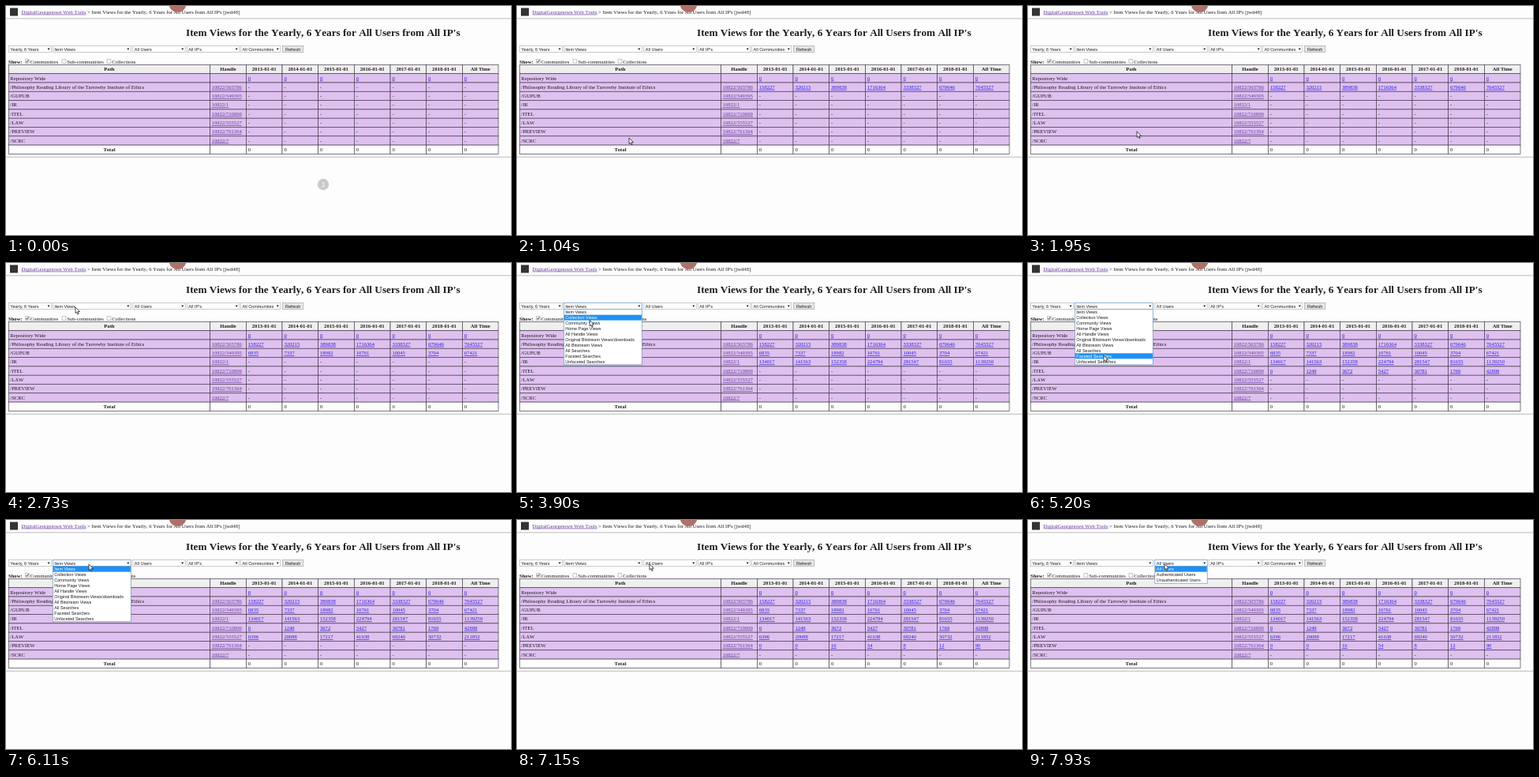
Write an HTML page that moves like this. It is 640x290 px and loops after 8 s.

```html
<!DOCTYPE html>
<html lang="en">
<head>
<meta charset="utf-8">
<title>Item Views</title>
<style>
html, body { margin: 0; width: 100%; height: 100%; overflow: hidden; background: #fdfdfd; }
svg { display: block; width: 640px; height: 290px; }
text { font: 6.62px "Liberation Serif", "Times New Roman", serif; font-kerning: none; white-space: pre; fill: #1c1c1c; }
.b { font-weight: bold; }
.h1 { font-size: 13.23px; font-weight: bold; }
.s { font: 5.51px "Liberation Sans", Arial, sans-serif; }
.m { text-anchor: middle; }
.link { fill: #2a1cd8; text-decoration: underline; }
.seen { fill: #66399a; text-decoration: underline; }
.white { fill: #fff; }
</style>
</head>
<body>
<svg id="stage" viewBox="0 0 640 290"></svg>
<script>
const stage = document.getElementById('stage');
const LOOP = 8000, STEP = 130, ROW = 11.3, TOP = 74.4, ITEM = 6.95, LIST = 58.7;
const cols = [3.3, 258.6, 304.4, 350, 395.6, 441.4, 487, 532.6, 578.4, 624];
const heads = ['Path', 'Handle', ...[2013, 2014, 2015, 2016, 2017, 2018].map(y => y + '-01-01'), 'All Time'];

// path | handle | counts | time the counts arrive
const rows = [
  'Philosophy Reading Library of the Tarrowby Institute of Ethics|503786|158227 320215 389838 1716364 3338327 679646 7045527|780',
  'GUPUB|549395|6835 7337 18982 10761 10045 3704 67421|2080',
  'IR|1|134017 141563 152358 224794 281547 81655 1139250|3380',
  'ITEL|710899|0 1249 3672 5427 30781 1769 42898|4550',
  'LAW|555527|6396 20088 17217 41638 69240 50732 211852|5720',
  'PREVIEW|761364|0 0 16 54 8 12 90|6890',
  'SCRC|7||Infinity'
].map(r => r.split('|'));

const selects = [
  [3.3, 54.3, 'Yearly, 6 Years'], [59.3, 99, 'Item Views'], [160.8, 66.4, 'All Users'],
  [229.3, 66.4, "All IP's"], [297.5, 50.3, 'All Communities']
];
const menus = [
  { at: 1, from: 3120, to: 6500, items: ['Item Views', 'Collection Views', 'Community Views', 'Home Page Views',
    'All Handle Views', 'Original Bitstream Views/downloads', 'All Bitstream Views', 'All Searches',
    'Faceted Searches', 'Unfaceted Searches'] },
  { at: 2, from: 7410, to: LOOP, items: ['All Users', 'Authenticated Users', 'Unauthenticated Users'] }
];
// time, x, y of the pointer
const path = [[780, 142, 167], [1820, 142, 167], [2600, 88, 56], [3250, 88, 56], [3770, 92, 71],
  [5070, 96, 117], [5330, 96, 117], [5980, 105, 56], [6500, 105, 56], [7280, 173, 55.5], [LOOP, 173, 55.5]];

const text = (x, y, s, cls = '') => `<text x="${x}" y="${y}" class="${cls}">${s}</text>`;
const rect = (x, y, w, h, fill, stroke = 'none') =>
  `<rect x="${x}" y="${y}" width="${w}" height="${h}" fill="${fill}" stroke="${stroke}" stroke-width=".7"/>`;
const rule = y => rect(0, y, 640, 1, '#bcbcbc');

function row(i, cells, fill) {
  const y = TOP + i * ROW;
  return cells.map(([s, cls = '', dx = 2.4], c) => {
    const w = cols[c + 1] - cols[c], x = cols[c] + (/\bm\b/.test(cls) ? w / 2 : dx);
    return rect(cols[c], y, w, ROW, fill, '#4a4150') + text(x, y + 7.8, s, cls);
  }).join('');
}

function table(t) {
  const lilac = '#dfc1f0', seven = cell => Array(7).fill(cell);
  return row(0, heads.map(h => [h, 'b m']), '#efefef') +
    row(1, [['Repository Wide', '', 2], [''], ...seven(['0', 'link'])], lilac) +
    rows.map(([name, id, counts, due], i) => row(i + 2, [
      ['/' + name, '', 2], ['10822/' + id, 'seen', 2],
      ...(t >= +due ? counts.split(' ').map(n => [n, 'link']) : seven(['-']))
    ], lilac)).join('') +
    row(9, [['Total', 'b m'], [''], ...seven(['0'])], '#fdfdfd');
}

function select([x, w, label], open) {
  const r = x + w - 5;
  return rect(x, 50.6, w, 8, '#fff', open ? '#5f93c8' : '#b4b4b4') + text(x + 2, 56.6, label, 's') +
    `<path d="M${r} 53.4h3l-1.5 2.6z" fill="#222"/>`;
}

function check(x, label, on) {
  return rect(x, 67.7, 4.8, 4.8, '#fff', '#aaa') + text(x + 6.2, 72.6, label) +
    (on ? `<path d="M${x + 1} 70l1.2 1.4 1.9-3" fill="none" stroke="#222" stroke-width=".9"/>` : '');
}

function menu({ at, items }, y) {
  const [x, w] = selects[at];
  const hot = Math.max(0, Math.min(items.length - 1, Math.floor((y - LIST) / ITEM)));
  return rect(x, LIST - .3, w, items.length * ITEM + .9, '#fff', '#6f8fae') +
    rect(x + .4, LIST + hot * ITEM, w - .8, ITEM, '#1e90f5') +
    items.map((s, i) => text(x + 2, LIST + i * ITEM + 5.4, s, i === hot ? 's white' : 's')).join('');
}

function pointer(t) {
  const i = Math.max(1, path.findIndex(p => p[0] > t));
  const [a, b] = [path[i - 1], path[i]];
  const u = Math.max(0, (t - a[0]) / (b[0] - a[0])), e = u * u * (3 - 2 * u);
  return [1, 2].map(k => a[k] + (b[k] - a[k]) * e);
}

const title = "Item Views for the Yearly, 6 Years for All Users from All IP's";
const page = rect(5, 2.5, 10, 10, '#333') +
  text(19.6, 9.6, `<tspan class="seen">DigitalGeorgetown Web Tools</tspan> &gt; ${title} [jwd48]`) +
  '<circle cx="217.5" cy="-3" r="11" fill="#b0706a"/>' +
  rule(15.4) + text(228, 37.8, title, 'h1') +
  rect(350.4, 50.6, 26.4, 8, '#e6e6e6', '#a8a8a8') + text(363.6, 56.6, 'Refresh', 's m') +
  text(3, 72.6, 'Show:', 'b') + check(24.4, 'Communities', true) +
  check(71, 'Sub-communities') + check(128, 'Collections') + rule(190.8);

function draw(t) {
  const [x, y] = pointer(t), open = menus.find(m => t >= m.from && t < m.to);
  const fade = Math.min(1, Math.max(0, (1040 - t) / 940));
  stage.innerHTML = page + selects.map((s, i) => select(s, open && open.at === i)).join('') + table(t) +
    (open ? menu(open, y) : '') +
    `<g opacity="${fade}"><circle cx="402" cy="226" r="7.2" fill="#c9c9c9"/>` +
    `<text x="402" y="229" class="m white" style="font:8.5px 'Liberation Sans',sans-serif">1</text></g>` +
    (t >= path[0][0] ? `<path transform="translate(${x} ${y})" d="M0 0v7.6l1.7-1.6 1.2 2.9 1.3-.6-1.2-2.7h2.4z"
      fill="#fff" stroke="#222" stroke-width=".8"/>` : '');
}

let last = -1;
function tick(now) {
  const t = Math.floor(now % LOOP / STEP) * STEP;
  if (t !== last) draw(last = t);
  requestAnimationFrame(tick);
}
draw(0);
requestAnimationFrame(tick);
</script>
</body>
</html>
```
